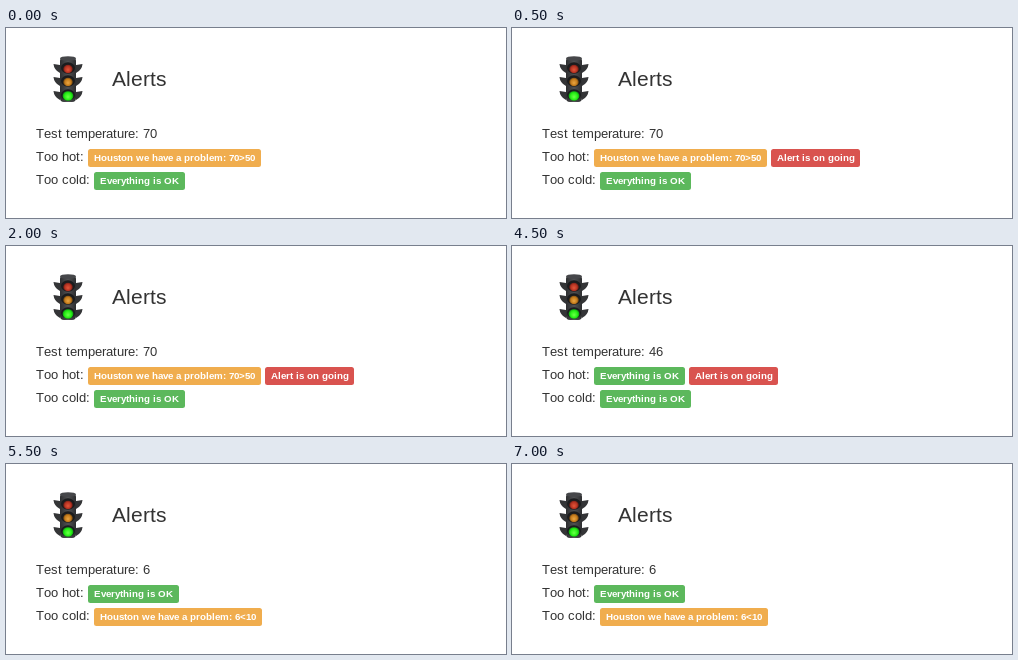
An HTML page with a canvas that plays this animation: 500x190 px, repeating every 8000 ms.

```html
<!DOCTYPE html>
<html>
<head>
<meta charset="utf-8">
<style>
html, body { margin: 0; width: 100%; height: 100%; overflow: hidden; background: #fff; }
canvas { display: block; }
</style>
</head>
<body>
<canvas id="stage" width="500" height="190"></canvas>
<script>
const ctx = document.getElementById('stage').getContext('2d');
const FONT = '"Liberation Sans", Arial, sans-serif';
const GREEN = '#5cb85c', ORANGE = '#f0ad4e', RED = '#d9534f';
const LOOP = 8000;
const PADDING = 5.85;

const ok = { text: 'Everything is OK', color: GREEN };
const hot = { text: 'Houston we have a problem: 70>50', color: ORANGE };
const cold = { text: 'Houston we have a problem: 6<10', color: ORANGE };
const ongoing = { text: 'Alert is on going', color: RED };

const states = [
  { at: 0, temp: 70, hot: [hot], cold: [ok] },
  { at: 500, temp: 70, hot: [hot, ongoing], cold: [ok] },
  { at: 3000, temp: 46, hot: [ok, ongoing], cold: [ok] },
  { at: 5500, temp: 6, hot: [ok], cold: [cold] }
];

const advance = char => Math.round(ctx.measureText(char).width);

// Each letter advances by whole pixels, as in hinted text.
function text(str, x, y, size, color = '#333', weight = 'normal') {
  ctx.font = `${weight} ${size}px ${FONT}`;
  ctx.fillStyle = color;
  for (const char of str) {
    ctx.fillText(char, x, y);
    x += advance(char);
  }
  return x;
}

function badge({ text: str, color }, x, y) {
  ctx.font = `bold 9.75px ${FONT}`;
  const end = x + [...str].reduce((sum, char) => sum + advance(char), 2 * PADDING);
  const left = Math.round(x);
  ctx.fillStyle = color;
  ctx.beginPath();
  ctx.roundRect(left, y - 12, Math.round(end) - left, 18, 2.5);
  ctx.fill();
  text(str, Math.round(x + PADDING), y, 9.75, '#fff', 'bold');
  return end;
}

function row(label, y, badges) {
  let x = text(label + ' ', 30, y, 13);
  for (const item of badges) x = badge(item, x, y) + 4;
}

function ellipse(x, y, rx, ry, fill) {
  ctx.fillStyle = fill;
  ctx.beginPath();
  ctx.ellipse(x, y, rx, ry, 0, 0, Math.PI * 2);
  ctx.fill();
}

function visor(y, side) {
  ctx.fillStyle = '#343537';
  ctx.beginPath();
  ctx.moveTo(62 + side * 8, y - 4);
  ctx.lineTo(62 + side * 14.5, y - 5);
  ctx.quadraticCurveTo(62 + side * 14, y + 1, 62 + side * 8, y + 4);
  ctx.fill();
}

function lamp(y, radius, bright, mid, dark) {
  visor(y, -1);
  visor(y, 1);
  ellipse(62, y - 1, 7, 5.8, '#1b1c1e');
  const glow = ctx.createRadialGradient(62, y + 1, 0.5, 62, y, radius);
  glow.addColorStop(0, bright);
  glow.addColorStop(0.6, mid);
  glow.addColorStop(1, dark);
  ellipse(62, y, radius, radius * 0.9, glow);
}

function trafficLight() {
  const metal = ctx.createLinearGradient(53, 0, 71, 0);
  metal.addColorStop(0, '#292a2c');
  metal.addColorStop(0.5, '#505153');
  metal.addColorStop(1, '#292a2c');
  ctx.fillStyle = metal;
  ctx.beginPath();
  ctx.roundRect(54, 30, 16, 44, [3, 3, 4, 4]);
  ctx.fill();
  ellipse(62, 30.5, 8, 2.3, '#46474a');
  lamp(41, 4.8, '#dc5137', '#b83423', '#621a13');
  lamp(54, 4.8, '#e5a03c', '#c57c1c', '#664010');
  lamp(68, 5.4, '#62ff42', '#26ef15', '#0d9a12');
}

function draw(time) {
  const state = states.filter(s => s.at <= time).pop();
  ctx.fillStyle = '#fff';
  ctx.fillRect(0, 0, 500, 190);
  trafficLight();
  text('Alerts', 106, 58, 21);
  text(`Test temperature: ${state.temp}`, 30, 110, 13);
  row('Too hot:', 133, state.hot);
  row('Too cold:', 156, state.cold);
}

function tick() {
  draw(performance.now() % LOOP);
  requestAnimationFrame(tick);
}
tick();
</script>
</body>
</html>
```
